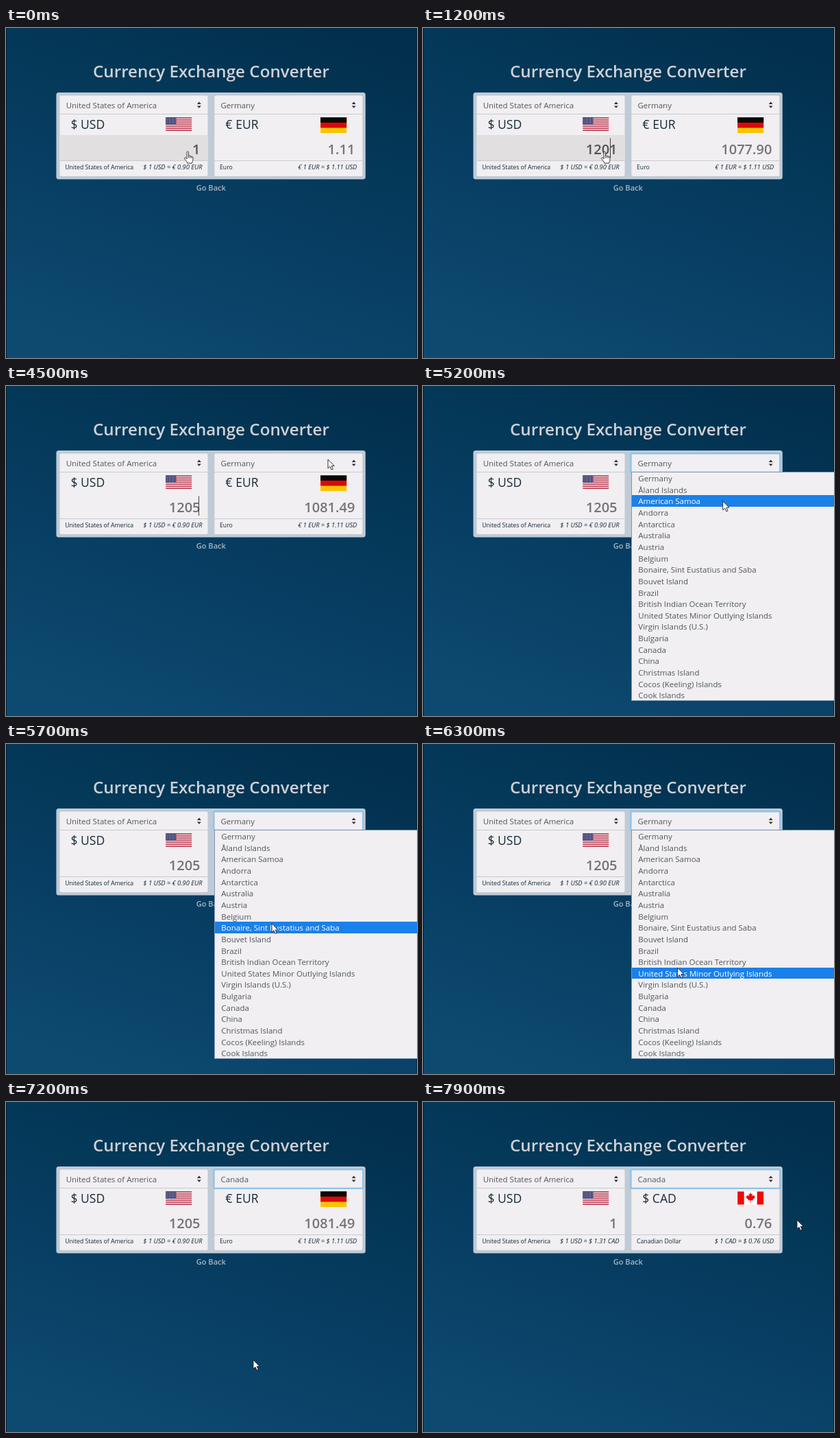
An HTML page for the animation above (8000 ms loop, 600 by 481 pixels).

```html
<!DOCTYPE html>
<html lang="en">
<head>
<meta charset="utf-8">
<title>Currency Exchange Converter</title>
<style>
  html, body { margin: 0; width: 100%; height: 100%; overflow: hidden; background: #073a5b; }
  svg { display: block; width: 600px; height: 481px; font-family: "Open Sans", "Noto Sans", sans-serif; }
  .title { font-size: 24.2px; font-weight: 600; fill: #cfd1d6; text-anchor: middle; }
  .back { font-size: 11.1px; font-weight: 600; fill: #a9b7c3; text-anchor: middle; }
  .pick, .item { font-size: 11.5px; fill: #50565d; }
  .code { font-size: 17.5px; fill: #172a3c; }
  .amount { font-size: 20px; font-weight: 600; fill: #777477; text-anchor: end; }
  .note { font-size: 8.7px; fill: #14283a; }
  .rate { font-size: 9.3px; font-style: italic; fill: #14283a; text-anchor: end; }
</style>
</head>
<body>
<svg id="stage" viewBox="0 0 600 481" xmlns="http://www.w3.org/2000/svg">
  <defs>
    <linearGradient id="sea" gradientUnits="userSpaceOnUse" x1="390" y1="-25" x2="210" y2="506">
      <stop offset="0" stop-color="#022f4c"/>
      <stop offset=".28" stop-color="#043858"/>
      <stop offset=".62" stop-color="#083f65"/>
      <stop offset="1" stop-color="#0e4a70"/>
    </linearGradient>
  </defs>
  <rect width="600" height="481" fill="url(#sea)"/>
  <path d="M.5 0V481" stroke="#03182a"/>
  <path d="M599.5 0V481" stroke="#03182a" opacity=".6"/>
  <text class="title" x="299.5" y="72">Currency Exchange Converter</text>
  <text class="back" x="299.3" y="237.4">Go Back</text>
  <rect x="73.4" y="94" width="451.4" height="126.5" rx="3.5" fill="#bfcbd6"/>
  <g id="panels"></g>
  <g id="usa"></g>
  <g id="germany">
    <rect x="459.2" y="130.4" width="38" height="22.6" fill="#f7c500"/>
    <rect x="459.2" y="130.4" width="38" height="15.1" fill="#dd0808"/>
    <rect x="459.2" y="130.4" width="38" height="7.5" fill="#080808"/>
  </g>
  <g id="canada">
    <rect x="459.2" y="130.4" width="38" height="19" fill="#fff"/>
    <path d="M459.2 130.4h9.5v19h-9.5zM487.7 130.4h9.5v19h-9.5z" fill="#f00808"/>
    <path transform="translate(478.2 139.9)" fill="#f00808" d="M0-8L1.3-5.4 2.7-6 2-2.4 3.8-4.1 4.3-3.1 6.5-3.4 5.8-1.2 6.7-.6 3.2 2.4 3.6 3.7 .4 3.3V7H-.4V3.3L-3.6 3.7-3.2 2.4-6.7-.6-5.8-1.2-6.5-3.4-4.3-3.1-3.8-4.1-2-2.4-2.7-6-1.3-5.4z"/>
  </g>
  <path id="caret" stroke="#3c3a3c" stroke-width="1"/>
  <g id="menu">
    <rect x="304.5" y="125.5" width="300" height="333" fill="#f1eff1" stroke="#7d97b0"/>
    <rect id="mark" x="305" width="295" height="16.63" fill="#1a80ea" shape-rendering="crispEdges"/>
    <g id="items"></g>
  </g>
  <path id="arrow" d="M0 0V13L3 10.3 5.1 15 7.3 14 5.2 9.5H9.2z" fill="#fff" stroke="#1c1c20" stroke-width=".9" stroke-linejoin="round"/>
  <path id="hand" d="M0 1.2C0-.4 2.4-.4 2.4 1.2V6.2C3.2 5.5 4.6 5.8 4.7 6.8 5.5 6.2 6.8 6.6 6.9 7.6 7.8 7.1 8.9 7.6 8.9 8.8V12C8.9 14 7.7 14.6 7.6 17H.7C.5 14.5-1.6 13.4-3.3 10.6-4 9.4-2.6 8.2-1.5 9.2L0 10.8zM2.4 6.2V9.5M4.7 6.8V9.7M6.9 7.6V9.9" fill="#fff" stroke="#242226" stroke-width=".9" stroke-linejoin="round"/>
</svg>
<script>
const LOOP = 8000, STEP = 100, RATE = 0.8975;
const ROW = 16.63, MENU_TOP = 126;
const OPEN = 4800, CHOSEN = 7200, LOADED = 7400;
const countries = ["Germany", "Åland Islands", "American Samoa", "Andorra", "Antarctica",
  "Australia", "Austria", "Belgium", "Bonaire, Sint Eustatius and Saba", "Bouvet Island",
  "Brazil", "British Indian Ocean Territory", "United States Minor Outlying Islands",
  "Virgin Islands (U.S.)", "Bulgaria", "Canada", "China", "Christmas Island",
  "Cocos (Keeling) Islands", "Cook Islands"];

// time, amount typed, caret x
const typing = [[0, "1", 0], [300, "1", 273.5], [600, "11", 273.5], [800, "121", 273.5],
  [1000, "1201", 273.5], [2000, "1201", 281.5], [2500, "120", 281.5], [3400, "1205", 281.5]];

// time, pointer x, pointer y
const path = [[0, 264, 180], [3700, 264, 180], [4300, 470, 107], [4900, 470, 107],
  [5600, 388, 261.5], [5900, 388, 261.5], [6600, 361, 368], [6800, 361, 368],
  [7000, 361, 376], [7200, 361, 376], [7600, 561, 182], [7800, 546, 172], [LOOP, 546, 172]];

const $ = id => document.getElementById(id);
const show = (id, on) => $(id).setAttribute("display", on ? "inline" : "none");
const set = (id, text) => { $(id).textContent = text; };
const label = (cls, id, x, y) => `<text class="${cls}" id="${id}" x="${x}" y="${y}"></text>`;

function panel(side, x) {
  return `<rect x="${x}" y="98.5" width="216" height="117.5" rx="2" fill="#f1eff1"/>
    <rect id="${side}Input" x="${x}" y="156" width="216" height="37" fill="#e2dfe1"/>
    <path d="M${x} 125.5h216M${x} 193.5h216" stroke="#c9c9ce"/>
    <rect id="${side}Focus" x="${x - 1}" y="98.3" width="218" height="27.6" rx="2" fill="none" stroke="#8fc3ea" stroke-width="2.4"/>
    <path d="M${x + 200.4} 111l3-3.4 3 3.4zM${x + 200.4} 113.4l3 3.4 3-3.4z" fill="#2c3238"/>`
    + label("pick", side + "Pick", x + 9.2, 116.5)
    + label("code", side + "Code", x + 16, 146.6)
    + label("amount", side + "Amount", x + 205, 183.6)
    + label("note", side + "Note", x + 7.7, 205.8)
    + label("rate", side + "Rate", x + 208, 205.8);
}

function usFlag() {
  const x = 233.2, y = 130.3, w = 38, h = 19.5, stripe = h / 13;
  let out = `<rect x="${x}" y="${y}" width="${w}" height="${h}" fill="#f8f4f6"/>`;
  for (let i = 0; i < 13; i += 2)
    out += `<rect x="${x}" y="${y + i * stripe}" width="${w}" height="${stripe}" fill="#b5223c"/>`;
  out += `<rect x="${x}" y="${y}" width="15.2" height="${7 * stripe}" fill="#3c3b6e"/>`;
  for (let r = 0; r < 9; r++)
    for (let c = r % 2; c < 11; c += 2)
      out += `<circle cx="${x + 1.3 + c * 1.27}" cy="${y + 1.1 + r * 1.05}" r=".42" fill="#fff"/>`;
  return out;
}

$("panels").innerHTML = panel("left", 78.5) + panel("right", 304.3);
$("usa").innerHTML = usFlag();
$("items").innerHTML = countries.map((name, i) =>
  `<text class="item" x="314.3" y="${139.2 + i * ROW}">${name}</text>`).join("");
set("leftPick", "United States of America");
set("leftNote", "United States of America");
set("leftCode", "$ USD");
show("leftFocus", false);
show("rightInput", false);

function pointerAt(t) {
  const i = path.findIndex(p => p[0] > t);
  const [t0, x0, y0] = path[i - 1], [t1, x1, y1] = path[i];
  const u = (t - t0) / (t1 - t0), e = u * u * (3 - 2 * u);
  return [x0 + (x1 - x0) * e, y0 + (y1 - y0) * e];
}

function draw(t) {
  const [x, y] = pointerAt(t);
  const [since, amount, caretX] = typing.filter(k => k[0] <= t).pop();
  const open = t >= OPEN && t < CHOSEN, loaded = t >= LOADED;
  const hover = x > 79 && x < 294 && y > 156 && y < 193;

  set("leftAmount", loaded ? "1" : amount);
  set("leftRate", loaded ? "$ 1 USD = $ 1.31 CAD" : "$ 1 USD = € 0.90 EUR");
  set("rightPick", t >= CHOSEN ? "Canada" : "Germany");
  set("rightCode", loaded ? "$ CAD" : "€ EUR");
  set("rightAmount", loaded ? "0.76" : t < 600 ? "1.11" : (amount * RATE).toFixed(2));
  set("rightNote", loaded ? "Canadian Dollar" : "Euro");
  set("rightRate", loaded ? "$ 1 CAD = $ 0.76 USD" : "€ 1 EUR = $ 1.11 USD");
  show("germany", !loaded);
  show("canada", loaded);

  show("leftInput", hover);
  $("leftAmount").style.fill = hover ? "#565256" : "#777477";
  show("rightFocus", t >= OPEN);
  $("caret").setAttribute("d", `M${caretX} 160.5V189`);
  show("caret", caretX && t < OPEN && (t - since) % 1000 < 500);

  show("menu", open);
  const row = Math.max(0, Math.floor((y - MENU_TOP) / ROW));
  $("mark").setAttribute("y", MENU_TOP + row * ROW);
  [...$("items").children].forEach((item, i) => { item.style.fill = i === row ? "#fff" : ""; });

  show("hand", hover);
  show("arrow", !hover);
  for (const id of ["hand", "arrow"]) $(id).setAttribute("transform", `translate(${x} ${y})`);
}

const start = performance.now();
function tick() {
  const t = (performance.now() - start) % LOOP;
  draw(Math.floor(t / STEP) * STEP);
  requestAnimationFrame(tick);
}
tick();
</script>
</body>
</html>
```
